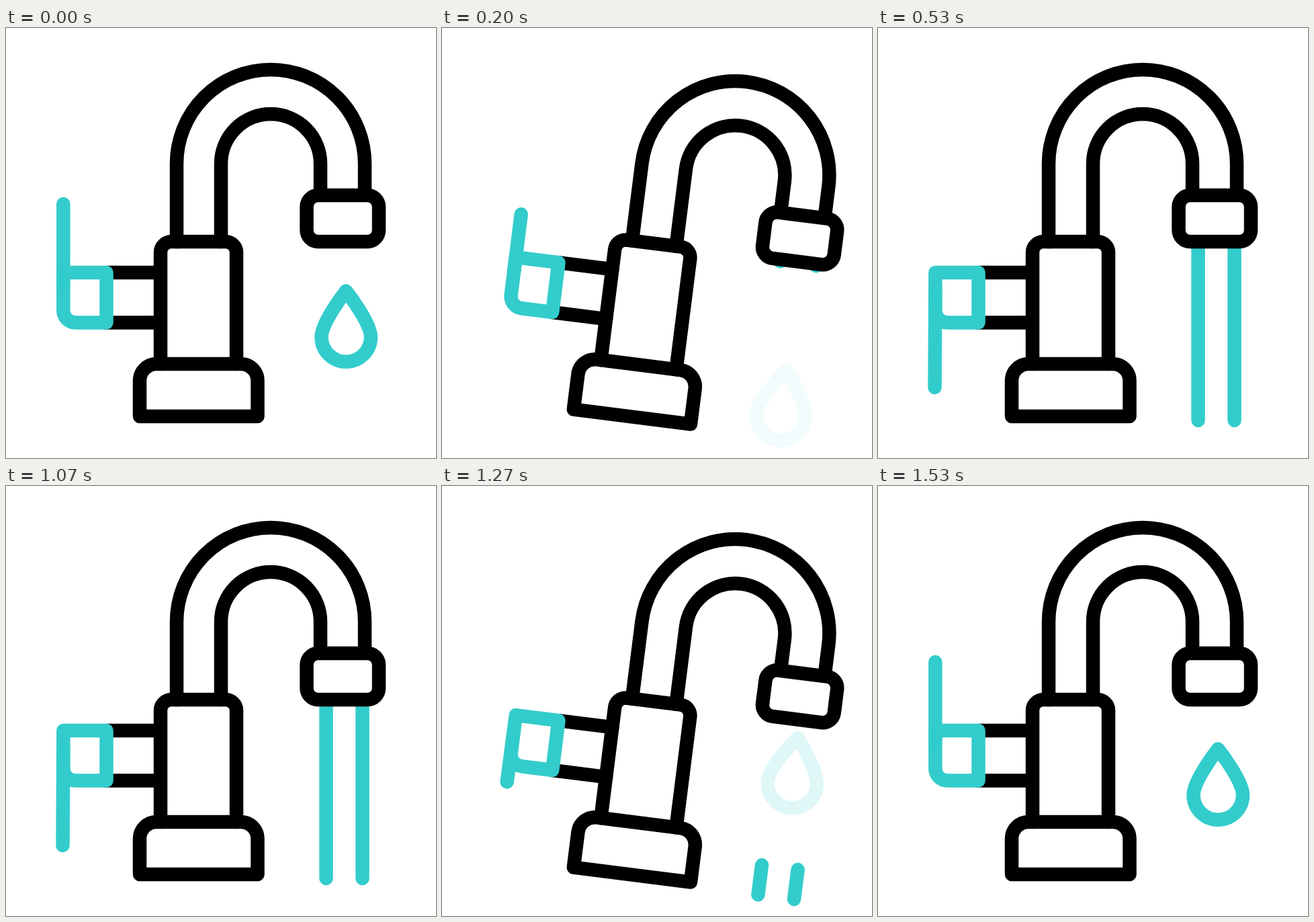
These frames come from a looping animation (640 px wide and 640 px high, 1.67 s). An HTML page:

```html
<!DOCTYPE html>
<html lang="en">
<head>
<meta charset="utf-8">
<title>Tap</title>
<style>
  html, body { margin: 0; width: 100%; height: 100%; overflow: hidden; background: #fff; }
  svg { display: block; width: 100%; height: 100%; }
  g, path { fill: none; stroke-width: 20.5; stroke-linecap: round; stroke-linejoin: round; }
  .teal { stroke: #3cc; }
  .black { stroke: #000; }
</style>
</head>
<body>
<svg viewBox="0 0 640 640">
  <g id="tap">
    <path id="drop" class="teal" d="M506 391.5C506 391.5 469.5 438 469.5 460a36.75 36.75 0 0 0 73.5 0C543 438 506 391.5 506 391.5Z"/>
    <path id="water" class="teal"/>
    <g class="black">
      <path d="M254 318V202a140 140 0 0 1 280 0V249"/>
      <path d="M320 318V202a74 74 0 0 1 148 0V249"/>
      <rect x="447.5" y="249" width="107.5" height="69" rx="17" fill="#fff"/>
      <path d="M149 364H230M149 438.5H230"/>
      <path d="M230 500V334a16 16 0 0 1 16-16H327a16 16 0 0 1 16 16V500"/>
      <path d="M199 578V525a25 25 0 0 1 25-25H349.5a25 25 0 0 1 25 25V578Z"/>
    </g>
    <g class="teal">
      <path d="M85.3 364H149.5V438.5H103.3a18 18 0 0 1-18-18Z"/>
      <path id="lever"/>
    </g>
  </g>
</svg>
<script>
  const LOOP = 1670, STEPS_PER_MS = 0.03;
  const OPEN = 0, CLOSE = 32;          // steps at which each shake starts
  const SPOUT = 300, FLOOR = 584;      // ends of the water jets
  const [tap, drop, water, lever] =
    ['tap', 'drop', 'water', 'lever'].map(id => document.getElementById(id));

  const mix = (a, b, p) => a + (b - a) * p;

  // Symmetric ease: cubic-bezier(h, 0, 1 - h, 1)
  function ease(x, h = 1 / 3) {
    if (x <= 0) return 0;
    if (x >= 1) return 1;
    let lo = 0, hi = 1;
    for (let i = 0; i < 24; i++) {
      const s = (lo + hi) / 2, r = 1 - s;
      if (3 * r * r * s * h + 3 * r * s * s * (1 - h) + s ** 3 < x) lo = s; else hi = s;
    }
    return lo * lo * (3 - 2 * lo);
  }
  const span = (k, from, to) => ease((k - from) / (to - from));

  const SWING = [[0, 0], [5, 7.7], [10, -3], [14, 0]];
  function swing(k) {
    for (let i = 1; i < SWING.length; i++) {
      const [k0, a0] = SWING[i - 1], [k1, a1] = SWING[i];
      if (k < k1) return mix(a0, a1, ease((k - k0) / (k1 - k0), 0.6));
    }
    return 0;
  }

  // Steps start at multiples of 1/30 s, rounded to 10 ms
  function stepAt(t) {
    const k = Math.round(t * STEPS_PER_MS);
    return Math.round(k * 10 / 3) * 10 > t ? k - 1 : k;
  }

  function draw(k) {
    const closing = k >= CLOSE;
    const n = k - (closing ? CLOSE : OPEN);
    tap.setAttribute('transform', `rotate(${swing(n)} 280 548)`);

    const down = closing ? 1 - span(n, 4, 10) : span(n, 4.6, 10.6);
    lever.setAttribute('d', `M85.3 385L${mix(85.3, 84.5, down)} ${mix(262, 535, down)}`);

    const fade = closing ? span(n, 4, 12) : 1 - span(n, 0, 7);
    const dy = closing ? mix(-55.5, 0, fade) : mix(94, 0, fade);
    drop.setAttribute('opacity', fade);
    drop.setAttribute('transform', `translate(0 ${dy})`);

    const top = closing ? mix(SPOUT, FLOOR, span(n, 0, 8)) : SPOUT;
    const end = closing ? FLOOR : mix(SPOUT, FLOOR, span(n, 4, 16));
    water.setAttribute('d', end - top > 0.5
      ? [476.5, 530.5].map(x => `M${x} ${top}V${end}`).join('') : '');
  }

  const start = performance.now();
  function tick() {
    draw(stepAt((performance.now() - start) % LOOP));
    requestAnimationFrame(tick);
  }
  tick();
</script>
</body>
</html>
```
